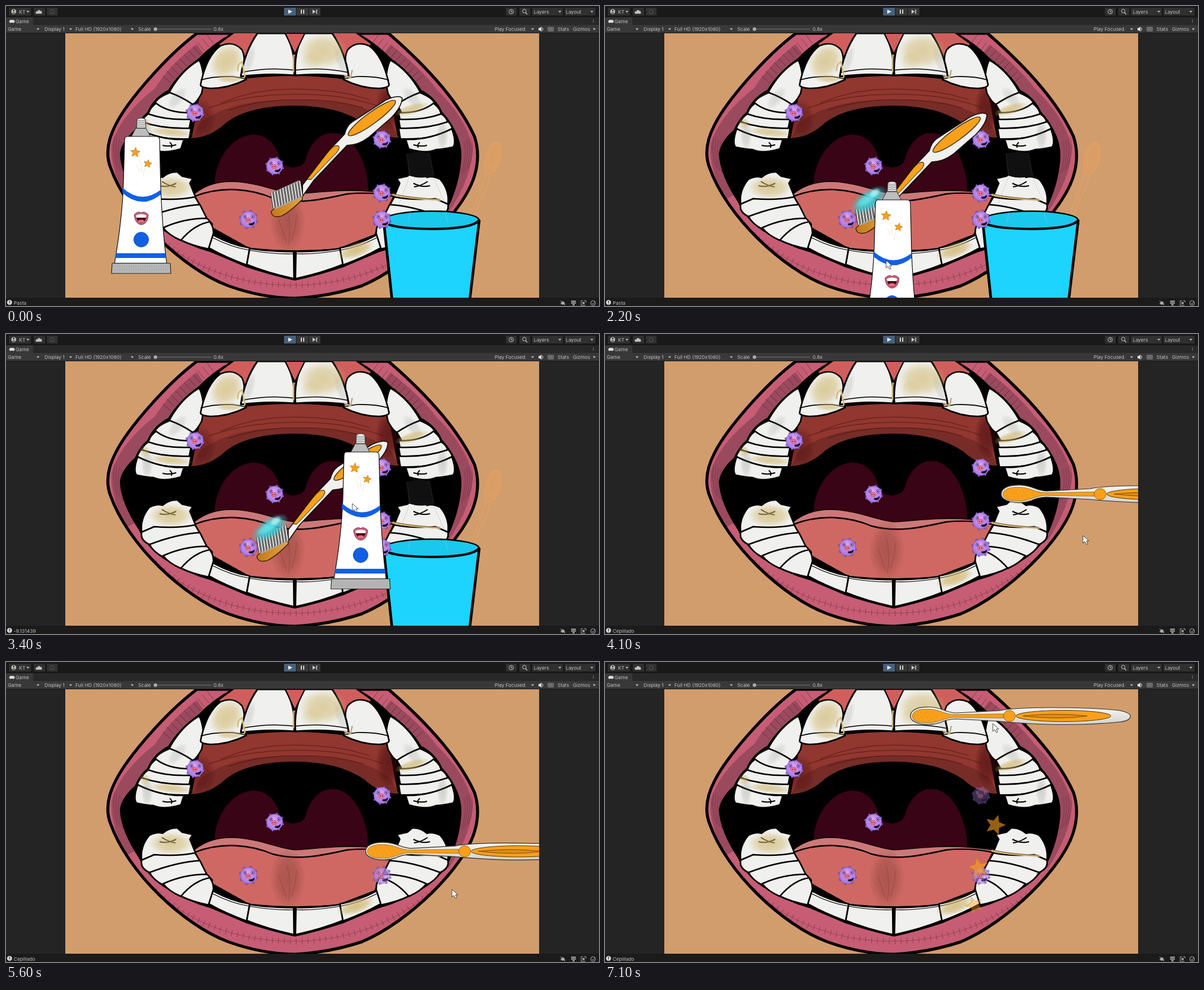
Write an HTML page with a canvas that moves like this. It is 1000 px wide and 506 px high and loops after 7200 ms.

```html
<!DOCTYPE html>
<html lang="en">
<head>
<meta charset="utf-8">
<title>Brush the teeth</title>
<style>
html, body { margin: 0; width: 100%; height: 100%; overflow: hidden; background: #222; }
canvas { display: block; width: 100vw; height: 100vh; }
</style>
</head>
<body>
<canvas id="stage" width="1000" height="506"></canvas>
<script>
const ctx = document.getElementById('stage').getContext('2d');
const LOOP = 7200, STEP = 100, BRUSHING = 4100;
const ORANGE = '#f9a01b', BLUE = '#1160e4', TOOTH = '#f0f0ee', TEXT = '#c0c0c0';

// Drawing helpers

function shape(d, fill, line = '#000', width = 2.6) {
  const p = new Path2D(d);
  if (fill) { ctx.fillStyle = fill; ctx.fill(p); }
  if (line) { ctx.strokeStyle = line; ctx.lineWidth = width; ctx.stroke(p); }
}

function oval(x, y, rx, ry, fill, line, width = 1, turn = 0) {
  ctx.beginPath();
  ctx.ellipse(x, y, rx, ry, turn, 0, Math.PI * 2);
  if (fill) { ctx.fillStyle = fill; ctx.fill(); }
  if (line) { ctx.strokeStyle = line; ctx.lineWidth = width; ctx.stroke(); }
}

function rect(x, y, w, h, fill) {
  ctx.fillStyle = fill;
  ctx.fillRect(x, y, w, h);
}

function label(text, x, y, color = TEXT) {
  ctx.font = '8.2px Inter, "Liberation Sans", sans-serif';
  ctx.fillStyle = color;
  ctx.fillText(text, x, y);
}

function at(x, y, draw, alpha = 1) {
  ctx.save();
  ctx.translate(x, y);
  ctx.globalAlpha *= alpha;
  draw();
  ctx.restore();
}

// Soft round patch; color is "r,g,b"
function soft(x, y, rx, ry, color, alpha, turn = 0) {
  ctx.save();
  ctx.translate(x, y);
  ctx.rotate(turn);
  ctx.scale(rx, ry);
  const g = ctx.createRadialGradient(0, 0, 0, 0, 0, 1);
  g.addColorStop(0, `rgba(${color},${alpha})`);
  g.addColorStop(0.55, `rgba(${color},${alpha * 0.75})`);
  g.addColorStop(1, `rgba(${color},0)`);
  oval(0, 0, 1, 1, g);
  ctx.restore();
}

function both(draw) {
  draw();
  ctx.save();
  ctx.translate(974, 0);
  ctx.scale(-1, 1);
  draw();
  ctx.restore();
}

function star(x, y, r, turn = 0, alpha = 1) {
  at(x, y, () => {
    ctx.rotate(turn);
    ctx.beginPath();
    for (let i = 0; i < 10; i++) {
      const a = i * Math.PI / 5 - Math.PI / 2, k = i % 2 ? r * 0.45 : r;
      ctx.lineTo(Math.cos(a) * k, Math.sin(a) * k);
    }
    ctx.closePath();
    ctx.fillStyle = ORANGE;
    ctx.fill();
    ctx.strokeStyle = '#c07c14';
    ctx.lineWidth = 0.8;
    ctx.stroke();
  }, alpha);
}

// Motion: keys are [time, ...values], eased between neighbours
function track(keys, t) {
  const i = keys.findIndex(k => k[0] > t);
  if (i === 0) return keys[0].slice(1);
  if (i < 0) return keys[keys.length - 1].slice(1);
  const a = keys[i - 1], b = keys[i];
  const u = (t - a[0]) / (b[0] - a[0]), e = u * u * (3 - 2 * u);
  return a.slice(1).map((v, n) => v + (b[n + 1] - v) * e);
}

const tubeKeys = [[0, 228, 189], [800, 228, 189], [900, 530, 177], [1200, 530, 177],
  [1700, 474, 240], [2200, 484, 296], [2700, 520, 262], [3400, 598, 168], [4000, 640, 190]];
const brushKeys = [[0, 0, 0], [1500, 0, 0], [1900, -24, 28]];
const scrubKeys = [[4100, 668, 270], [4500, 606, 312], [4700, 618, 322], [5000, 664, 237],
  [5300, 604, 318], [5500, 608, 352], [5800, 602, 226], [6000, 612, 232], [6300, 545, 109], [7100, 515, 91]];
const pointerKeys = [[400, 150, 380], [900, 252, 277], [1000, 252, 277], [1600, 465, 380],
  [2200, 474, 429], [2700, 510, 392], [3400, 584, 286], [4000, 628, 312], [4100, 806, 340],
  [4500, 744, 382], [5000, 799, 304], [5500, 752, 402], [5900, 752, 284], [6300, 700, 144], [7100, 654, 104]];

// Mouth

function lips() {
  const outer = 'M322 46C270 85 205 160 185 200Q164 240 176 272C205 355 300 444 375 472Q430 492 487 493Q545 490 600 472C680 438 775 345 791 283Q800 250 790 220C762 158 705 98 645 46Z';
  ctx.save();
  ctx.clip(new Path2D(outer));
  rect(160, 46, 650, 450, '#c65d74');
  const shade = 'rgba(90,45,60,.4)';
  shape('M330 76Q285 110 262 148Q205 192 192 236Q190 272 215 320', null, shade, 28);
  shape('M640 76Q690 115 714 148Q762 194 773 240Q772 285 735 340', null, shade, 28);
  const folds = 'M250 385C325 452 410 471 487 471C565 470 650 448 724 382';
  const crease = 'rgba(70,20,35,.4)';
  shape(folds, null, crease, 0.8);
  ctx.setLineDash([1, 9]);
  shape(folds, null, crease, 10);
  shape('M345 56Q305 86 270 124M622 56Q668 90 700 126', null, crease, 18);
  ctx.setLineDash([]);
  for (let i = 0; i < 4; i++) {
    shape(`M${183 + i * 4} ${220 + i * 3}q-5 27 6 55M${785 - i * 4} ${220 + i * 3}q5 27-6 55`, null, crease, 0.8);
  }
  ctx.restore();
  shape(outer, null, '#000', 5);
  shape('M385 46Q350 64 326 90Q294 112 275 143Q250 156 240 180Q226 192 219 210Q196 230 194 250Q196 285 226 330Q238 358 266 377Q305 402 345 413L404 438Q450 453 487 461Q525 453 570 438L629 413Q670 402 708 377Q736 358 748 330Q765 290 766 252Q766 230 755 210Q746 192 734 180Q724 156 699 143Q680 112 648 90Q624 64 590 46Z',
    '#000', '#000', 4);
}

function throat() {
  shape('M352 310C349 260 382 217 418 217C444 217 458 240 463 260C469 276 498 276 505 261C511 234 528 214 551 214C586 214 612 268 611 312L560 325H390Z', '#390415', null);
  const arch = 'L662 222Q630 222 604 198Q560 168 487 168Q410 168 372 196Q345 222 312 223Z';
  shape('M328 138Q350 128 405 121Q487 112 570 122Q620 128 646 138' + arch, '#91372f');
  shape('M328 196Q365 170 420 162Q490 154 560 162Q620 172 650 198' + arch, '#772c27', null);
  shape('M341 172Q410 148 487 149Q575 148 637 172M362 164Q420 139 487 140Q560 140 613 158M375 176Q425 158 487 158Q555 157 603 172', null, 'rgba(40,5,5,.6)', 0.9);
  soft(645, 170, 22, 42, '70,10,15', 0.6);
  soft(330, 190, 24, 34, '70,10,15', 0.4);
}

function tongue() {
  shape('M316 318C340 299 365 294 395 297C440 302 462 316 490 317C535 314 580 306 654 317V340H318Z', '#cd7878', '#000', 1.2);
  shape('M318 321C365 303 412 308 450 324C492 335 530 327 575 317Q615 313 654 321L622 386L560 410Q487 417 410 409L340 370Z', '#cf6862', '#000', 2.4);
  soft(475, 365, 30, 52, '120,60,50', 0.4);
  shape('M474 343Q482 372 476 404M460 360Q468 384 473 399M490 350Q488 380 481 396', null, 'rgba(90,35,30,.2)', 1.5);
}

function backTeeth() {
  // upper row
  shape('M276 144Q296 108 326 91Q337 115 330 147Q321 164 314 166Q295 155 276 146Z', TOOTH);
  shape('M276 146Q250 157 252 166Q275 183 306 181L315 166Q296 153 276 146Z', TOOTH);
  shape('M253 164Q240 174 240 185Q275 197 309 195L312 180Q275 181 253 164Z', TOOTH);
  shape('M240 182Q228 190 229 200Q265 211 309 207L312 191Q270 193 240 182Z', TOOTH);
  shape('M228 195Q219 206 222 212Q260 226 309 224L312 206Q265 208 228 195Z', TOOTH);
  shape('M222 207Q214 230 220 238Q240 242 248 242Q265 250 295 241L300 225Q260 226 222 207Z', TOOTH);
  shape('M264 235Q275 238 287 234M276 230Q281 233 279 239', null, '#000', 2);
  soft(238, 218, 10, 26, '120,120,115', 0.25);
  soft(289, 155, 11, 24, '120,120,115', 0.2, 0.7);
  // lower row
  shape('M242 292Q255 286 264 289Q275 279 289 280L297 287L315 291L310 299L320 323Q275 332 248 327L229 336Q225 312 242 292Z', TOOTH);
  shape('M229 334L250 325Q290 328 319 322L327 336Q290 340 262 348L244 356Q225 348 229 334Z', TOOTH);
  shape('M242 355Q290 337 327 335L339 359Q310 360 281 371L265 376Q249 368 242 355Z', TOOTH);
  shape('M265 374Q300 358 339 358L348 368Q321 374 302 392L294 395Q274 386 265 374Z', TOOTH);
  shape('M295 395Q318 368 344 364Q352 376 349 388L343 410Q315 405 295 395Z', TOOTH);
  shape('M349 386Q380 403 411 408L406 437Q370 424 342 408Z', TOOTH);
  shape('M411 409Q450 415 485 414L486 460Q440 450 406 436Z', TOOTH);
  shape('M349 391Q380 407 411 412Q450 419 484 418', null, '#000', 1.2);
  shape('M259 303Q272 307 287 299M263 296Q275 304 286 305', null, '#000', 2);
}

function frontTeeth() {
  shape('M385 46H590L615 64L590 104H385L360 64Z', '#d15e5c', null);
  both(() => {
    shape('M328 133Q338 84 362 67Q384 58 398 74Q405 88 399 104L405 124Q375 139 345 139Q329 138 328 133Z', TOOTH);
    shape('M328 125Q350 118 383 119L405 123', null, '#000', 1.6);
    shape('M396 119Q402 78 424 46H471Q489 75 486 117Q440 113 396 119Z', TOOTH, '#000', 3);
    shape('M397 112Q440 103 485 108', null, '#000', 1.5);
    soft(410, 91, 9, 28, '130,130,125', 0.2, 0.3);
  });
  shape('M471 46H504L487 81Z', '#d15e5c', '#000', 2);
  shape('M485 82V112M570 117L581 121L584 108', null, '#c5aa72', 2.5);
}

function stains() {
  const s = '207,182,108';
  soft(372, 93, 26, 34, s, 0.65, 0.7);
  soft(378, 123, 24, 7, s, 0.6);
  soft(535, 76, 42, 30, s, 0.6);
  soft(515, 93, 20, 16, s, 0.3);
  soft(278, 213, 38, 8, s, 0.65, 0.1);
  soft(234, 198, 10, 10, s, 0.5);
  soft(684, 174, 30, 9, s, 0.7, -0.3);
  soft(278, 306, 38, 20, s, 0.65);
  soft(590, 412, 34, 13, s, 0.8, -0.35);
  shape('M391 110Q389 99 398 94L403 120', null, '#d8bb7b', 2.5);
  shape('M652 318Q675 324 733 327', null, '#d5b77a', 3.5);
  shape('M653 317Q690 325 731 326', null, '#54421f', 0.8);
}

function mouth() {
  rect(100, 46, 799, 446, '#d29d6d');
  lips();
  throat();
  tongue();
  both(backTeeth);
  frontTeeth();
  stains();
  shape('M486 412V458', null, '#000', 3);
}

// Things in the scene

function germ(x, y, alpha) {
  if (alpha <= 0) return;
  at(x, y, () => {
    for (let i = 0; i < 8; i++) {
      const a = i * Math.PI / 4 + 0.25;
      oval(Math.cos(a) * 14.3, Math.sin(a) * 14.3, 1.7, 1.7, '#9a70d6', '#4a3078', 0.7);
    }
    const g = ctx.createRadialGradient(-2, -6, 1, 0, 0, 14);
    g.addColorStop(0, '#dfa0ee');
    g.addColorStop(0.6, '#ba88ec');
    g.addColorStop(1, '#a478ea');
    oval(0, 0, 13.8, 13.8, g, '#7450a8', 0.6);
    for (const s of [-6, 7]) {
      oval(s, -4.5, 2.4, 3, '#c4a6ee', '#4a3070', 0.8);
      oval(s, -4.5, 0.9, 1.3, '#24123b');
    }
    oval(-1, 1, 4.5, 3.5, '#ef7f94', '#b34a68', 0.8);
    oval(-2.6, 1, 0.9, 1.3, '#8d2138');
    oval(0.8, 1, 0.9, 1.3, '#8d2138');
    shape('M1 7Q6 8 10 4Q9 12 1 9Z', '#160b22', '#160b22', 0.8);
  }, alpha);
}

function glass() {
  shape('M637 364L651 496H782L798 362Z', '#1dd4ff', '#000', 4.5);
  oval(717.5, 361, 80, 15, '#1bc8ed', '#000', 2.4);
  shape('M638 364Q645 375 717 376Q787 376 798 361', null, '#000', 4);
  shape('M682 347L678 363M740 347L745 365', null, 'rgba(130,210,220,.5)', 1);
}

function spareItems() {
  const line = 'rgba(236,164,89,.8)';
  oval(821, 257, 12, 28, 'rgba(225,159,94,.45)', line, 1.2, 0.25);
  oval(822, 253, 8, 21, null, line, 0.8, 0.25);
  shape('M809 281Q799 319 778 365M818 285Q804 323 783 366', null, line, 1);
  shape('M676 249Q695 244 714 248L722 286Q700 293 679 286Z', '#101010', null);
  ctx.setLineDash([2, 2]);
  shape('M676 249L681 286M714 248L721 285M680 289L662 337M721 289L742 337', null, 'rgba(120,120,120,.55)', 0.8);
  ctx.setLineDash([]);
}

function tube() {
  shape('M-9 17H8L16 32H-17Z', '#bdbdbd', '#333', 1);
  shape('M-7 2Q0-2 7 2L8 17H-8Z', '#ededed', '#333', 1);
  for (let y = 4; y < 17; y += 3) shape(`M-7 ${y}Q0 ${y + 2} 7 ${y}`, null, '#555', 0.8);
  shape('M-23 31H25Q31 31 31 37L33 120Q36 190 43 245H-45Q-32 170-30 110L-28 37Q-28 31-23 31Z', '#fff', '#111', 1.2);
  shape('M-31 118Q0 146 33 121L33 129Q1 155-32 126Z', BLUE, null);
  shape('M-43 228H41L42 236H-44Z', BLUE, null);
  shape('M-49 245H49L50 262H-50Z', '#bfbfbf', '#222', 1.2);
  for (let x = -46; x < 49; x += 3) shape(`M${x} 247V260`, null, '#888', 0.6);
  star(-10, 58, 8.5, 0.1);
  star(11, 77, 7, 0.2);
  shape('M-4 71Q2 78 0 91M7 84Q3 90 4 99M-8 79Q-3 84-3 91', null, 'rgba(215,170,110,.4)', 0.8);
  shape('M-12 163Q-5 156 0 160Q5 156 12 163Q11 179 0 180Q-10 179-12 163Z', '#c8617b', '#73243b', 0.8);
  shape('M-9 164Q0 160 9 164Q8 176 0 177Q-7 176-9 164Z', '#4a0815', null);
  shape('M-9 164Q0 160 9 164L8 168H-8Z', '#fff', null);
  oval(0, 174, 5, 2.5, '#e5737b');
  oval(0, 205, 12.5, 12.5, BLUE, '#0a43a7', 0.8);
}

function brush(pasted) {
  const hatch = ctx.createLinearGradient(450, 0, 497, 0);
  hatch.addColorStop(0, '#c47a1b');
  hatch.addColorStop(1, '#e2a23e');
  shape('M500 302L546 242Q563 225 571 216Q574 203 583 196L640 159Q661 149 668 155Q668 169 650 188L611 222Q594 235 575 235L519 294L500 321Z', '#f1f0ed', '#111', 1.6);
  oval(617, 189, 49, 9.5, ORANGE, '#2a1b05', 1.2, -0.63);
  shape('M508 292L541 249Q554 232 561 236Q565 242 550 255L514 293Z', ORANGE, '#2a1b05', 1);
  shape('M447 347Q453 338 499 317L500 326Q479 347 465 354Q449 359 447 347Z', hatch, '#241704', 1.3);
  shape('M448 315L494 294L498 323L453 343Z', '#aaa', null);
  for (let i = 0; i < 11; i++) {
    const x = 448 + i * 4.7, y = 315 - i * 2, d = `M${x} ${y}L${x + 4} ${y + 26}`;
    shape(d, null, '#181818', 3.8);
    shape(d, null, '#f7f7f4', 2);
  }
  if (pasted) {
    soft(469, 299, 36, 17, '45,204,213', 1, -0.58);
    soft(466, 298, 24, 9, '120,232,236', 0.7, -0.58);
    soft(479, 287, 11, 7, '205,250,250', 0.7, -0.6);
  }
}

function flatBrush() {
  const g = ctx.createLinearGradient(0, -15, 0, 15);
  g.addColorStop(0, '#f7f7f4');
  g.addColorStop(1, '#d0d0cd');
  shape('M0 0C0-12 17-16 34-15C52-14 60-6 76-5L150-9Q175-14 235-14Q315-14 354-9Q371-5 371 0Q371 8 354 10Q300 16 225 14Q180 12 150 9L76 5Q60 6 51 11Q34 17 16 13Q0 9 0 0Z', g, '#34302b', 1.2);
  shape('M3 0C4-10 18-12 32-11.5C48-11 58-3 74-2.2L157-3.5V3.5L74 2.2C58 3 48 11 32 11.5C18 12 4 10 3 0Z', ORANGE, '#8a5a10', 0.7);
  oval(167, 0, 10, 9.5, ORANGE, '#8a5a10', 0.8);
  oval(258, 0, 80, 9.5, ORANGE, '#5a390a', 1);
  shape('M190 0Q245-6 298 0Q252 7 190 0Z', '#dc8d14', '#744805', 0.9);
  for (let i = 0; i < 28; i++) {
    const a = i * 2.4, r = Math.sqrt(i / 28);
    oval(31 + Math.cos(a) * r * 25, Math.sin(a) * r * 9, 0.5, 0.5, '#c07410');
  }
}

function foam(t) {
  if (t < 5700 || t > 6500) return;
  const alpha = t < 6400 ? 0.95 : 0.4;
  at(640, 207, () => {
    shape('M-10 2Q-8-7-1-6Q1-11 6-7Q10-3 6 0Q13 4 8 9Q3 8 1 4Q-4 10-10 2Z', '#edf6f4', null);
    oval(-3, 1, 4, 3, '#8ed7d6');
  }, alpha);
  at(641, 252, () => shape('M-10-10Q-2-16 3-8Q14-9 10 1Q16 7 9 13Q2 15-1 7Q-9 8-8 0Q-14-5-10-10Z', '#e9e9e5', null), alpha);
}

function burst(t) {
  if (t < 6200) return;
  const u = (t - 6300) / 800, fade = Math.max(0, u);
  star(641 + 17 * u, 294 - 19 * u, 9 + 8 * u, 0.2 + u * 0.1, 1 - 0.4 * fade);
  star(634 - 4 * u, 302 + 45 * u, 7 + 10 * u, 0.4 - u * 0.6, 1 - 0.35 * fade);
  star(640 - 17 * u, 298 + 112 * u, 6 + 9 * u, 0.6 - u, 1 - 0.6 * fade);
}

function pointer(x, y) {
  at(x, y, () => shape('M0 0V13L3 10L6 15L8 14L6 9H10Z', '#fff', '#222', 0.8));
}

// Editor window

function arrow(x, y) {
  shape(`M${x - 2.5} ${y - 1.3}H${x + 2.5}L${x} ${y + 1.7}Z`, TEXT, null);
}

function editor(t) {
  rect(0, 0, 1000, 506, '#242424');
  rect(0, 0, 1000, 19, '#191919');
  rect(0, 19, 1000, 13, '#282828');
  rect(0, 19, 46, 13, '#373737');
  rect(0, 32, 1000, 13, '#383838');
  rect(0, 45, 1000, 1, '#1b1b1b');
  rect(0, 492, 1000, 14, '#1b1b1b');
  for (const [x, w] of [[5, 37], [47, 19], [69, 18], [843, 18], [866, 18], [887, 52], [942, 52]]) rect(x, 3, w, 13, '#303030');
  rect(469, 3, 20, 13, '#46607c');
  rect(490, 3, 20, 13, '#383838');
  rect(511, 3, 19, 13, '#383838');
  shape('M476 6L483 9.5L476 13Z', '#eee', null);
  rect(497, 6, 2, 7, '#ccc');
  rect(501, 6, 2, 7, '#ccc');
  shape('M517 6L522 9.5L517 13Z', '#ccc', null);
  rect(523, 6, 1.5, 7, '#ccc');

  oval(13, 9.5, 4.2, 4.2, TEXT);
  oval(13, 8, 1.4, 1.4, '#303030');
  shape('M10 12.5Q13 9 16 12.5Z', '#303030', null);
  label('KT', 22, 12.5);
  arrow(37, 9.5);
  shape('M51 13Q48 9 53 9Q54 5 58 8Q62 9 60 13Z', TEXT, null);
  oval(78, 9.5, 3.5, 3.5, null, '#555', 1);
  oval(852, 9.5, 3.7, 3.7, null, TEXT, 1);
  shape('M852 7V10H854', null, TEXT, 1);
  oval(874, 8.5, 3, 3, null, TEXT, 1);
  shape('M876 11L879 14', null, TEXT, 1.2);
  label('Layers', 890, 12.5);
  label('Layout', 944, 12.5);
  arrow(934, 9.5);
  arrow(988, 9.5);

  oval(8, 26, 2.5, 2.5, '#ddd');
  oval(12, 26, 2.5, 2.5, '#ddd');
  rect(8, 23.5, 4, 4, '#ddd');
  label('Game', 16, 29);
  for (let y = 23; y < 29; y += 2) rect(990, y, 1, 1, TEXT);

  label('Game', 3, 42);
  label('Display 1', 65, 42);
  label('Full HD (1920x1080)', 117, 42);
  label('Scale', 223, 42);
  label('0.8x', 350, 42);
  label('Play Focused', 824, 42);
  label('Stats', 930, 42);
  label('Gizmos', 956, 42);
  for (const x of [54, 109, 213, 888, 992]) arrow(x, 39);
  rect(253, 38.5, 93, 1, '#777');
  oval(252, 39, 3, 3, '#aaa');
  shape('M898 37H900L903 35V43L900 41H898Z', '#ddd', null);
  shape('M904 36Q907 39 904 42', null, '#ddd', 1);
  shape('M914 36H923V42H914ZM914 39H923M917 36V42M920 36V42', null, '#aaa', 0.8);

  oval(6, 500, 4.2, 4.2, '#ddd');
  rect(5.4, 497, 1.2, 4, '#222');
  rect(5.4, 502, 1.2, 1.2, '#222');
  label(t < 2900 ? 'Pasta' : t < BRUSHING ? '-9.131439' : 'Cepillado', 13, 504);
  oval(939, 501, 2.8, 2.8, '#aaa');
  shape('M935 497L943 505M935 502H943', null, '#aaa', 1);
  shape('M953 498H961M953 501H961M955 504H959', null, '#aaa', 1.8);
  shape('M970 497V505M970 497H973M975 497H978V500M970 505H977', null, '#aaa', 1);
  oval(974, 501, 2, 2, '#aaa');
  oval(990, 501, 4, 4, null, '#aaa', 1);
  shape('M988 501L990 503L993 499', null, '#aaa', 1);
}

function scene(t) {
  const brushing = t >= BRUSHING;
  mouth();
  if (!brushing) { spareItems(); glass(); }

  const [upper] = track([[5600, 1], [6200, 0.36], [7100, 0.33]], t);
  const [middle] = track([[4500, 1], [5000, 0.5], [5200, 0.45], [5600, 0]], t);
  const [lower] = track([[5200, 1], [5700, 0.65]], t);
  germ(319, 180, 1);
  germ(634, 225, upper);
  germ(453, 270, 1);
  germ(634, 315, middle);
  germ(409, 360, 1);
  germ(634, 360, lower);

  if (brushing) {
    foam(t);
    burst(t);
    at(...track(scrubKeys, t), flatBrush);
  } else {
    at(...track(brushKeys, t), () => brush(t >= 1900));
    at(...track(tubeKeys, t), tube);
  }
  if (t >= 400) pointer(...track(pointerKeys, t));
}

function draw(t) {
  ctx.lineJoin = 'round';
  editor(t);
  ctx.save();
  ctx.beginPath();
  ctx.rect(100, 46, 799, 446);
  ctx.clip();
  scene(t);
  ctx.restore();
}

const start = performance.now();
let shown = -1;
function tick() {
  const t = Math.floor((performance.now() - start) % LOOP / STEP) * STEP;
  if (t !== shown) draw(shown = t);
  requestAnimationFrame(tick);
}
tick();
</script>
</body>
</html>
```
